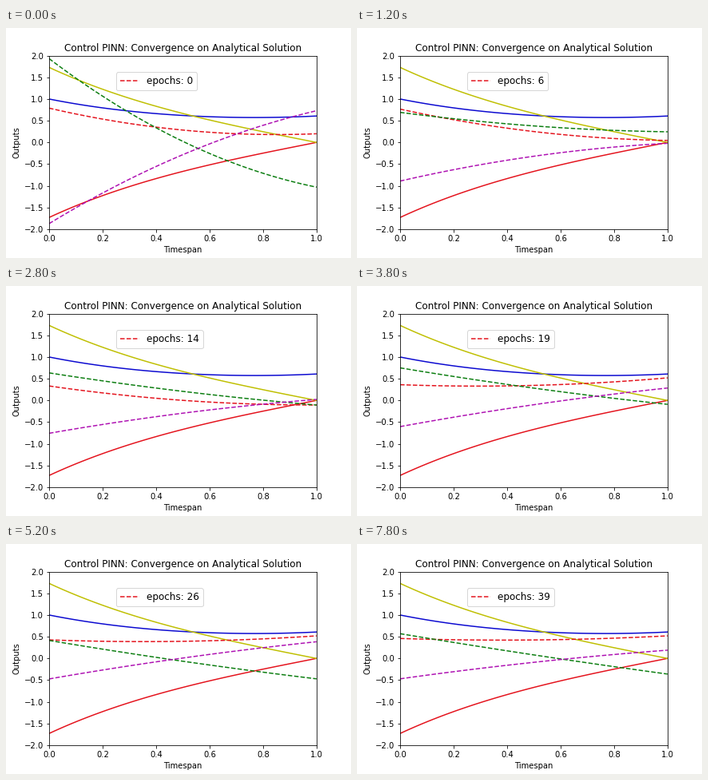
A matplotlib script for the animation above (8 s loop, 432x288 px).

```python
import numpy as np
import matplotlib.pyplot as plt
from matplotlib.animation import FuncAnimation

EPOCHS = 40
INTERVAL = 200
BLUE, RED, YELLOW = "#0a08d0", "#e4121c", "#bfbf00"
GREEN, MAGENTA = "#0a7d0f", "#ae10b2"

plt.rcParams["font.family"] = "DejaVu Sans"
plt.rcParams["font.size"] = 10

t = np.linspace(0, 1, 100)

# Analytical optimum of x' = x/2 + u with cost x^2 + u^2/2
k = 1.5
gain = 2 * np.tanh(k) / (k - 0.5 * np.tanh(k))
slope = (0.5 - gain) / k
state = np.cosh(k * t) + slope * np.sinh(k * t)
rate = k * (np.sinh(k * t) + slope * np.cosh(k * t))
control = rate - 0.5 * state


def eased(epoch, *keys):
    """Glide through (epoch, value) keys, then hold the last value."""
    for (e0, v0), (e1, v1) in zip(keys, keys[1:]):
        if epoch <= e1:
            s = (epoch - e0) / (e1 - e0)
            return v0 + (v1 - v0) * (1 - np.cos(np.pi * s)) / 2
    return keys[-1][1]


def curve(start, end, bend):
    return start + (end - start) * t - bend * t * (1 - t)


# Each trained output moves its two ends while its bend fades away
def net_state(e):
    start = eased(e, (0, 0.79), (5, 0.79), (12, 0.33), (33, 0.46))
    end = eased(e, (0, 0.20), (13, -0.15), (19, 0.52))
    return curve(start, end, 0.22 + 0.62 * np.exp(-e / 14))


def net_costate(e):
    start = eased(e, (0, 1.93), (8, 0.48), (19, 0.75), (28, 0.37), (39, 0.57))
    end = eased(e, (0, -1.03), (6, 0.245), (12, -0.11), (19, -0.09),
                (26, -0.47), (33, -0.36))
    return curve(start, end, 1.35 * np.exp(-e / 2) + 0.35 * np.exp(-e / 30))


def net_control(e):
    start = eased(e, (0, -1.87), (6, -0.89), (27, -0.47))
    end = eased(e, (0, 0.73), (8, -0.15), (24, 0.41), (33, 0.19))
    return curve(start, end, -0.2 - 0.95 * np.exp(-e / 6))


fig = plt.figure(figsize=(6, 4), dpi=72, facecolor="white")
fig.subplots_adjust(left=0.125, right=0.9, bottom=0.125, top=0.88)
ax = fig.add_subplot()
ax.set_xlim(0, 1)
ax.set_ylim(-2, 2)
ax.set_yticks(np.arange(-2, 2.1, 0.5))
ax.set_title("Control PINN: Convergence on Analytical Solution", fontsize=12)
ax.set_xlabel("Timespan")
ax.set_ylabel("Outputs")

for values, color in [(state, BLUE), (control, RED), (-control, YELLOW)]:
    ax.plot(t, values, color=color)

nets = [(net_state, RED), (net_costate, GREEN), (net_control, MAGENTA)]
lines = [ax.plot(t, net(0), "--", color=color)[0] for net, color in nets]
legend = ax.legend(lines[:1], ["epochs: 0"], loc=(0.25, 0.8), fontsize=12)
label = legend.get_texts()[0]


def update(epoch):
    for line, (net, _) in zip(lines, nets):
        line.set_ydata(net(epoch))
    label.set_text(f"epochs: {epoch}")
    return [*lines, label]


anim = FuncAnimation(fig, update, frames=EPOCHS, interval=INTERVAL,
                     repeat=True, repeat_delay=0)
plt.show()
```
